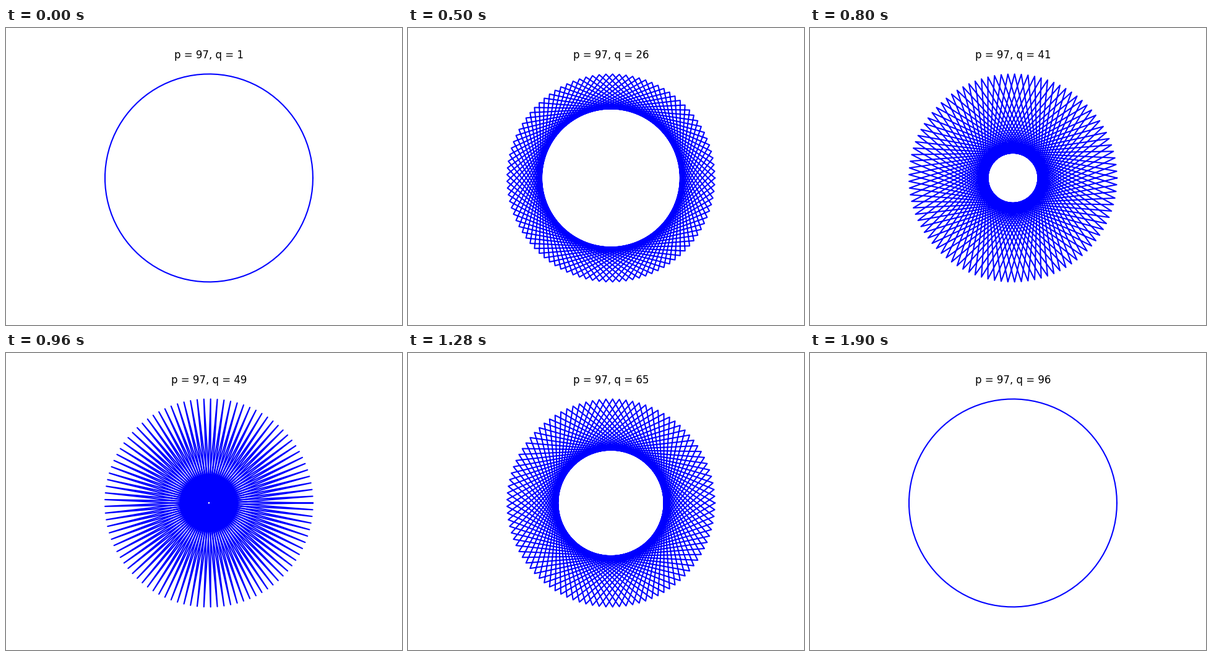
These frames come from a looping animation (640 by 480 pixels, 1920 ms). A matplotlib script:

```python
import numpy as np
import matplotlib.pyplot as plt
from matplotlib.animation import FuncAnimation

P = 97          # vertices on the circle
INTERVAL = 20   # ms per step


def star(q):
    """Closed star polygon {P/q} on the unit circle."""
    angle = 2 * np.pi * q * np.arange(P + 1) / P
    return np.cos(angle), np.sin(angle)


fig, ax = plt.subplots(figsize=(6.4, 4.8), dpi=100)
line, = ax.plot(*star(1), "b-", lw=1.5)
title = ax.set_title("")
ax.axis("equal")
ax.axis("off")


def update(i):
    q = i + 1
    line.set_data(*star(q))
    title.set_text(f"p = {P}, q = {q}")
    return line, title


anim = FuncAnimation(fig, update, frames=P - 1, interval=INTERVAL,
                     repeat=True, repeat_delay=0)
plt.show()
```
